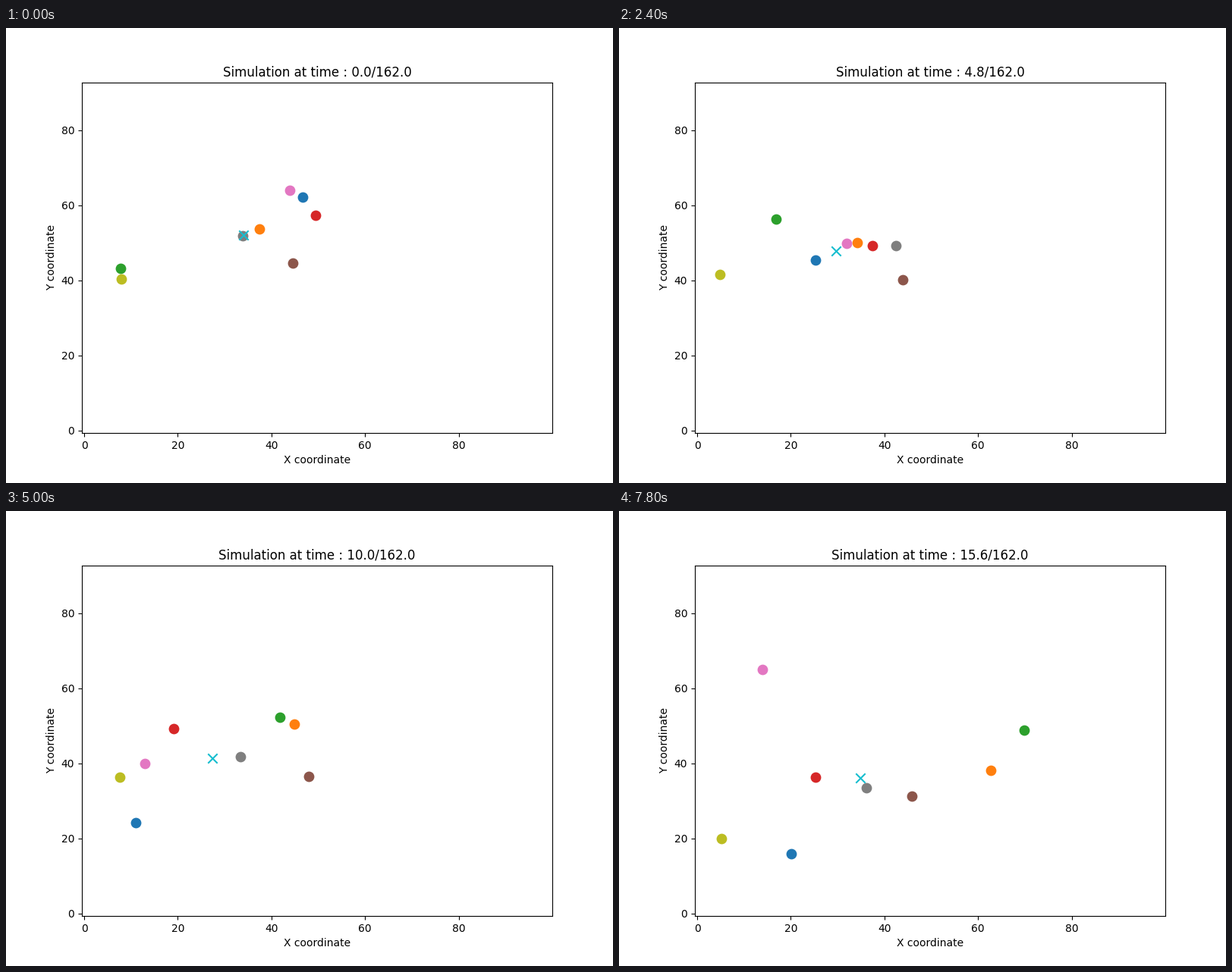
Animation of 800 by 600 pixels, one loop 8000 ms. Source, as a matplotlib script:

```python
import numpy as np
import matplotlib.pyplot as plt
from matplotlib.animation import FuncAnimation

FRAMES, INTERVAL = 40, 200
STEP, TOTAL = 0.4, 162.0

# Way-points in stage pixels, reached by every dot at these steps
TIMES = [0, 8, 12, 18, 25, 33, 39]
PATHS = {
    "C0": [(391.3, 223), (327.5, 278.3), (259.2, 306.2), (195, 353.7),
           (170.5, 411), (181, 416.3), (226.8, 451.8)],
    "C1": [(333.8, 264.5), (334.6, 278.7), (314.4, 283), (322.7, 283.8),
           (379.5, 280.7), (436.8, 314), (489.8, 341.7)],
    "C2": [(150.6, 317.1), (155.5, 277.5), (207.2, 251.8), (284.2, 242.2),
           (360.8, 272), (473.4, 284.8), (534.1, 289.2)],
    "C3": [(408.4, 247), (374.7, 267.2), (333.6, 287), (272.8, 299.3),
           (221, 287.2), (244.3, 306.4), (258.6, 351)],
    "C5": [(378.4, 309.7), (369, 329.8), (373.7, 331.7), (384.4, 339.8),
           (399.4, 349.9), (397.3, 370.2), (385.7, 375.5)],
    "C6": [(374, 214.2), (326.1, 259.8), (299.5, 283.7), (246.4, 309.8),
           (183.4, 333.4), (178.4, 245.3), (189.4, 209)],
    "C7": [(311.9, 273.8), (357.7, 277.7), (365.4, 287.2), (347.9, 304),
           (309.4, 323.5), (317.8, 358.5), (326.2, 364.6)],
    "C8": [(152.1, 331.2), (122, 319.1), (133.4, 324.7), (146.7, 334.4),
           (149.8, 351.2), (131.3, 390), (134.6, 431.6)],
}
# Extra way-points where a dot turns sharply
TURNS = {
    "C0": {24: (172, 406), 28: (171.5, 418.6), 36: (200, 426)},
    "C8": {6: (119.3, 318.7), 30: (136.3, 376)},
}


def spline(t, p, at):
    """Natural cubic spline through the points p at times t."""
    n, h = len(t), np.diff(t)
    slope = np.diff(p, axis=0) / h[:, None]
    a, b = np.eye(n), np.zeros_like(p)
    for i in range(1, n - 1):
        a[i, i - 1:i + 2] = h[i - 1], 2 * (h[i - 1] + h[i]), h[i]
        b[i] = 6 * (slope[i] - slope[i - 1])
    m = np.linalg.solve(a, b)
    i = np.clip(np.searchsorted(t, at, side="right") - 1, 0, n - 2)
    d, w = (at - t[i])[:, None], h[i][:, None]
    v = slope[i] - w * (2 * m[i] + m[i + 1]) / 6
    return p[i] + v * d + m[i] * d**2 / 2 + (m[i + 1] - m[i]) / (6 * w) * d**3


def track(name):
    keys = dict(zip(TIMES, PATHS[name])) | TURNS.get(name, {})
    t = np.array(sorted(keys), float)
    return spline(t, np.array([keys[k] for k in t]), np.arange(FRAMES))


fig, ax = plt.subplots(figsize=(8, 6), dpi=100)
ax.set_xlim(-0.5, 100)
ax.set_ylim(-0.7, 92.63)
ax.set_xticks(range(0, 100, 20))
ax.set_yticks(range(0, 100, 20)[:5])
ax.set_xlabel("X coordinate")
ax.set_ylabel("Y coordinate")
title = ax.set_title("")


def to_data(px):
    """Stage pixels (y down) to axes coordinates."""
    return ax.transData.inverted().transform(np.column_stack([px[:, 0], 600 - px[:, 1]]))


tracks = [to_data(track(name)) for name in PATHS]
center = np.mean(tracks, axis=0)
dots = [ax.scatter([0], [0], s=80, color=name) for name in PATHS]
cross = ax.scatter([0], [0], s=80, color="C9", marker="x")


def draw(i):
    for dot, path in zip(dots, tracks):
        dot.set_offsets(path[i])
    cross.set_offsets(center[i])
    title.set_text(f"Simulation at time : {i * STEP:.1f}/{TOTAL}")
    return [*dots, cross, title]


anim = FuncAnimation(fig, draw, frames=FRAMES, interval=INTERVAL, repeat=True)
plt.show()
```
